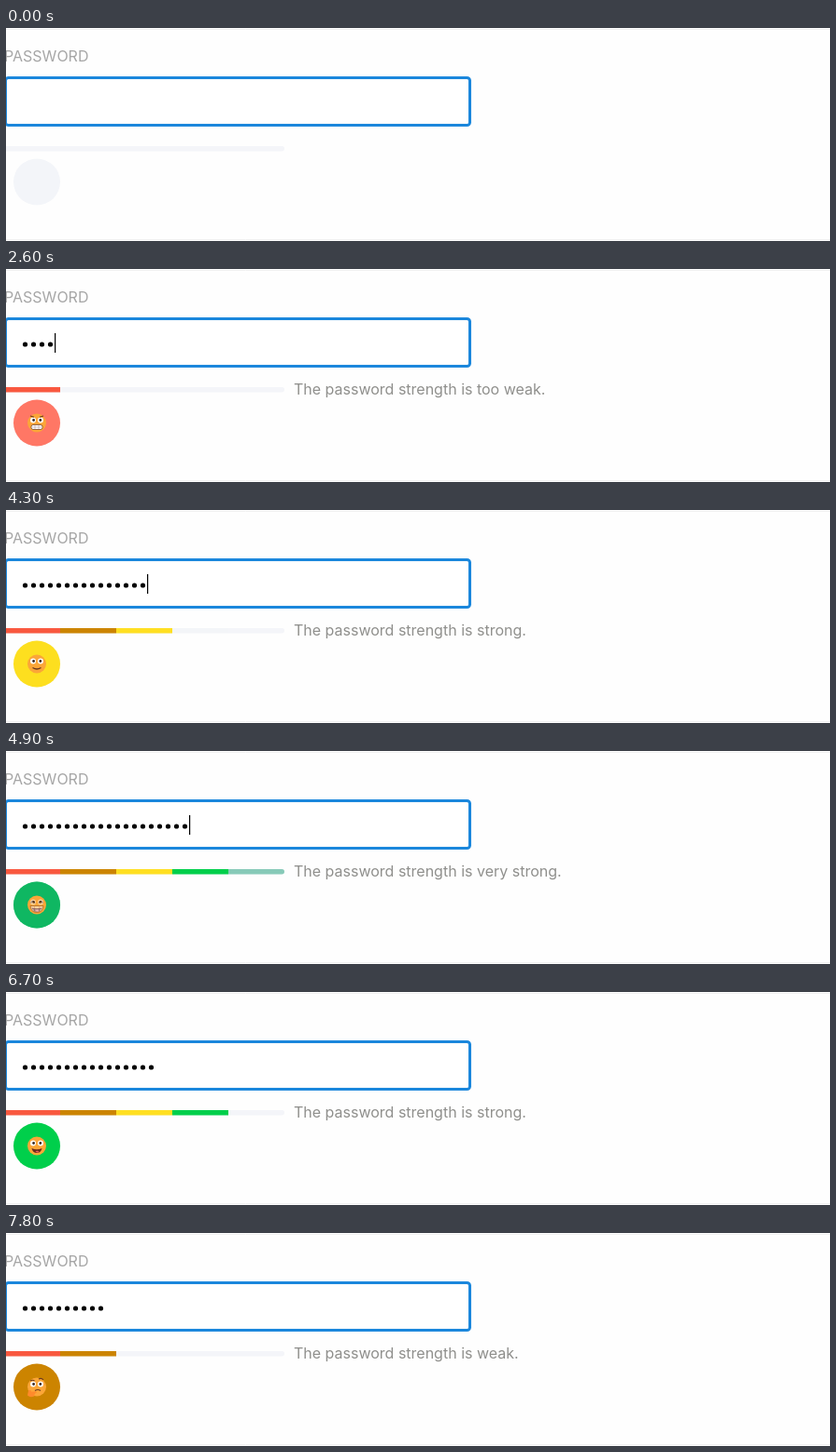
An HTML page for the animation above (8 s loop, 882 by 229 pixels).

```html
<!DOCTYPE html>
<html lang="en">
<head>
<meta charset="utf-8">
<title>Password strength</title>
<style>
  html, body { margin: 0; width: 100%; height: 100%; overflow: hidden; background: #fefefe; }
  svg { display: block; width: 882px; height: 229px; }
  text { font: 16px Inter, sans-serif; }
</style>
</head>
<body>
<svg viewBox="0 0 882 229">
  <defs>
    <clipPath id="track"><rect x="-2" y="127" width="300" height="5.5" rx="2.7"/></clipPath>
    <g id="head"><circle r="10" fill="#fba638"/></g>
    <g id="eyes">
      <circle cx="-4" cy="-3" r="3" fill="#fff"/><circle cx="4" cy="-3" r="3" fill="#fff"/>
      <circle cx="-3.4" cy="-3" r="1.4" fill="#3b2a25"/><circle cx="3.8" cy="-3" r="1.4" fill="#3b2a25"/>
    </g>
  </defs>

  <path d="M0 1.5H882M0 227.5H882" stroke="#f1f1f1"/>
  <text x="-2" y="36" fill="#a6a6a6">PASSWORD</text>
  <rect x="-.5" y="53.5" width="497" height="51" rx="3" fill="#fff" stroke="#1b87dc" stroke-width="3"/>
  <g id="dots"></g>
  <rect id="caret" y="69" width="1.2" height="21"/>

  <g clip-path="url(#track)">
    <rect x="-2" y="127" width="300" height="6" fill="#f4f5f9"/>
    <g id="bar"></g>
  </g>
  <text id="note" x="308" y="135" fill="#8f8f8c"></text>

  <g transform="translate(33 165.5)">
    <circle r="25" fill="#f3f5f9"/>
    <g class="badge"><circle r="25" fill="#ff7765"/>
      <use href="#head"/><use href="#eyes"/>
      <path d="M-7-7.5l4 1.2M7-7.5l-4 1.2" stroke="#6b3a1e" stroke-width="1.2"/>
      <rect x="-6" y="2" width="12" height="5" rx="2" fill="#fff" stroke="#7a4a2a" stroke-width=".8"/>
      <path d="M-5.5 4.5h11M-2 2.3v4.4M2 2.3v4.4" stroke="#a88" stroke-width=".5"/>
    </g>
    <g class="badge"><circle r="25" fill="#cc8400"/>
      <use href="#head"/><use href="#eyes"/>
      <path d="M-7-6.5q2.5-1.5 4.5 0M2-8.5q3-1.5 5 1" fill="none" stroke="#6b3a1e" stroke-width="1.2"/>
      <path d="M-2 4q3-2 6 0" fill="none" stroke="#6b3a1e" stroke-width="1.2"/>
      <path d="M-9 4q2-2 3 1l5 0q2 1-1 2l-1 3q-4 2-7-1z" fill="#ff8a2b"/>
    </g>
    <g class="badge"><circle r="25" fill="#ffe01f"/>
      <use href="#head"/><use href="#eyes"/>
      <path d="M-4.5 4q4.5 3 9 0" fill="none" stroke="#6b3a1e" stroke-width="1.3"/>
    </g>
    <g class="badge"><circle r="25" fill="#00cf4b"/>
      <use href="#head"/><use href="#eyes"/>
      <path d="M-5.5 2.5q5.5 2.5 11 0q-1 5-5.5 5t-5.5-5z" fill="#6b2a1e"/>
      <path d="M-1.5 6q2-1.5 4 .4q-2 1.5-4-.4z" fill="#f0605a"/>
    </g>
    <g class="badge"><circle r="25" fill="#1fa07a"/>
      <use href="#head"/>
      <path d="M-6.5-2q2.2-4 4.4 0M2.1-2q2.2-4 4.4 0" fill="none" stroke="#5a3018" stroke-width="1.4"/>
      <path d="M-7 1h14q-.5 7-7 7t-7-7z" fill="#fff" stroke="#6b3a1e" stroke-width=".9"/>
      <path d="M-6.3 4h12.6M-2.5 1v6.5M2.5 1v6.5" stroke="#a88" stroke-width=".6"/>
    </g>
  </g>
</svg>
<script>
const LOOP = 8000, FADE = 200, STEP = 9;
const NS = 'http://www.w3.org/2000/svg';
const colors = ['#f9583f', '#cc8400', '#ffdf22', '#00cf4b', '#1fa07a'];
const words = ['too weak', 'weak', 'medium', 'strong', 'very strong'];
const minLength = [1, 7, 12, 15, 19];

// Key presses: each typed time adds a character, each erased time removes one.
const typed = [1800, 2200, 2400, 2600, 2700, 2900, 3000, 3200, 3300, 3400, 3500,
  3700, 3900, 4000, 4300, 4400, 4500, 4700, 4800, 4900];
const erased = [6200, 6300, 6500, 6700, 6900, 7100, 7200, 7400, 7600, 7800];
const caretOn = [[100, 600], [1200, 1700], [1800, 5500], [6000, 6500], [7000, 7500]];

const $ = id => document.getElementById(id);
const add = (parent, tag, attrs) => {
  const el = document.createElementNS(NS, tag);
  for (const k in attrs) el.setAttribute(k, attrs[k]);
  return parent.appendChild(el);
};
const past = (list, t) => list.filter(x => x <= t).length;
const lengthAt = t => past(typed, t) - past(erased, t);
const levelAt = t => past(minLength, lengthAt(t));

const switches = [...typed, ...erased]
  .filter(t => levelAt(t) !== levelAt(t - 1))
  .map(t => ({ t, from: levelAt(t - 1), to: levelAt(t) }));

const dots = typed.map((_, i) => add($('dots'), 'circle', { cx: 20.5 + i * STEP, cy: 81, r: 2.6 }));
const segments = colors.map((fill, i) =>
  add($('bar'), 'rect', { x: -2 + i * 60, y: 127, width: 60, height: 6, fill }));
const badges = [...document.querySelectorAll('.badge')];

function draw(now) {
  const t = now % LOOP;
  const count = lengthAt(t);
  dots.forEach((d, i) => d.style.display = i < count ? '' : 'none');
  $('caret').setAttribute('x', 16 + count * STEP);
  $('caret').style.display = caretOn.some(([a, b]) => t >= a && t < b) ? '' : 'none';

  const { t: start, from, to } = switches.filter(s => s.t <= t).pop() || { t: 0, from: 0, to: 0 };
  const k = Math.min(1, (t - start) / FADE);
  const mix = (a, b) => a + (b - a) * k;
  const low = Math.min(from, to), high = Math.max(from, to);
  segments.forEach((s, i) => s.style.opacity = mix(+(i < from), +(i < to)));
  badges.forEach((b, i) => {
    const n = i + 1;
    b.style.opacity = n === high ? mix(+(n === from), +(n === to)) : +(n === low);
  });
  $('note').textContent = to ? `The password strength is ${words[to - 1]}.` : '';
}

const origin = performance.now();
(function frame() {
  draw(performance.now() - origin);
  requestAnimationFrame(frame);
})();
</script>
</body>
</html>
```
